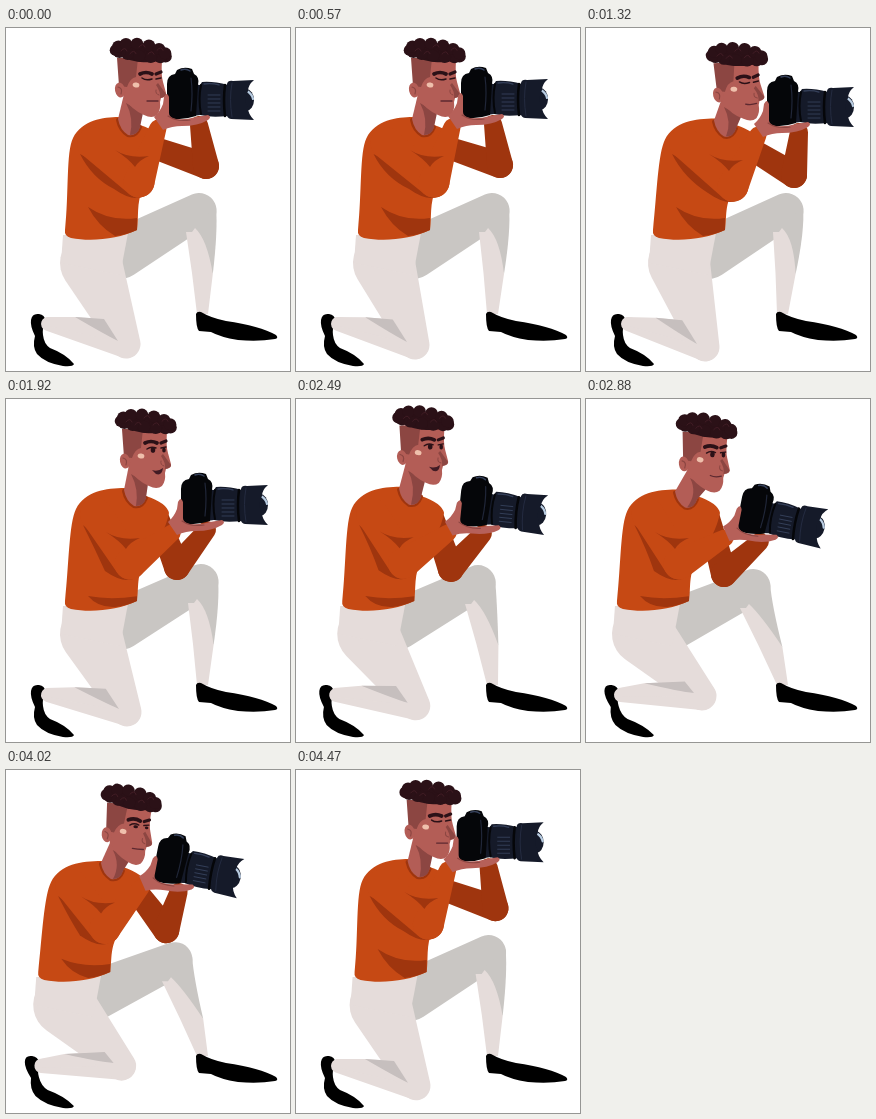
Animation of 284x343 px, one loop 4500 ms. Source, as an HTML page with a canvas:

```html
<!DOCTYPE html>
<html lang="en">
<head>
<meta charset="utf-8">
<title>Kneeling photographer</title>
<style>
html, body { margin: 0; width: 100%; height: 100%; overflow: hidden; background: #fff; }
canvas { display: block; width: 284px; height: 343px; }
</style>
</head>
<body>
<canvas id="stage"></canvas>
<script>
const W = 284, H = 343, LOOP = 4500;
const canvas = document.getElementById('stage');
const ctx = canvas.getContext('2d');
const dpr = window.devicePixelRatio || 1;
canvas.width = W * dpr;
canvas.height = H * dpr;

const C = {
  shirt: '#c64914', shirtDark: '#9f350e', skin: '#b35d56', skinDark: '#8c4642',
  hand: '#b66059', hair: '#2b1117', curl: '#49212a', blush: '#efc0ac',
  pants: '#e5dcda', pantsDark: '#c9c6c3', pantsFold: '#c6bfbe',
  black: '#050609', lens: '#151a29', steel: '#35405a', glint: '#b9cde2'
};

// Motion tracks: one value per time in TIMES.
const TIMES = [0, 570, 1320, 1920, 2250, 2880, 3600];
const TRACKS = {
  waist: [0, 3, 8, 0, -5, -28, -47],
  collar: [0, 4, 16, 6, 0, -23, -29],
  headX: [135, 139, 153, 140, 133, 119, 113],
  headY: [60, 60, 64, 60, 54, 64, 69],
  headTurn: [0, 0, -3, 0, 0, 3, 11],
  camX: [175, 179, 195, 189, 184, 168, 157],
  camY: [66, 65, 73, 100, 99, 110, 108],
  camTurn: [0, 0, 0, 0, 3, 11, 20],
  elbowX: [133, 138, 147, 124, 116, 93, 74],
  elbowY: [154, 154, 158, 165, 164, 165, 163],
  farElbowX: [200, 204, 208, 171, 165, 138, 130],
  farElbowY: [138, 137, 147, 168, 168, 175, 178],
  kneeX: [192, 195, 199, 194, 189, 166, 150],
  kneeY: [184, 184, 184, 184, 184, 189, 197],
  nearKneeX: [120, 119, 119, 121, 121, 116, 112],
  nearKneeY: [316, 317, 319, 313, 311, 297, 280],
  heel: [0, 0, 0, 0, 0, -7, -12],
  relaxed: [0, 0, 0, 1, 1, 1, 1],
  smile: [0, 0, .3, 1, .9, .4, .2]
};

// Monotone cubic interpolation around the loop.
function sample(values, t) {
  const n = TIMES.length;
  const time = k => TIMES[(k + n) % n] + LOOP * Math.floor(k / n);
  const val = k => values[(k + n) % n];
  const slope = k => (val(k + 1) - val(k)) / (time(k + 1) - time(k));
  const tangent = k => {
    const a = slope(k - 1), b = slope(k);
    return a * b > 0 ? 2 * a * b / (a + b) : 0;
  };
  let i = n - 1;
  while (TIMES[i] > t) i--;
  const span = time(i + 1) - time(i), u = (t - time(i)) / span, v = 1 - u;
  return val(i) * (1 + 2 * u) * v * v + val(i + 1) * (3 - 2 * u) * u * u
    + span * u * v * (tangent(i) * v - tangent(i + 1) * u);
}

const mix = (a, b, k) => a + (b - a) * k;

function fill(d, color) {
  ctx.fillStyle = color;
  ctx.fill(new Path2D(d));
}

function line(d, color, width) {
  ctx.strokeStyle = color;
  ctx.lineWidth = width;
  ctx.lineCap = ctx.lineJoin = 'round';
  ctx.stroke(new Path2D(d));
}

function oval(x, y, rx, ry, color, turn = 0) {
  ctx.fillStyle = color;
  ctx.beginPath();
  ctx.ellipse(x, y, rx, ry, turn, 0, Math.PI * 2);
  ctx.fill();
}

// Tapered limb: the hull of two circles.
function limb([x1, y1], r1, [x2, y2], r2, color) {
  const dir = Math.atan2(y2 - y1, x2 - x1);
  const open = Math.acos((r1 - r2) / Math.hypot(x2 - x1, y2 - y1));
  ctx.fillStyle = color;
  ctx.beginPath();
  ctx.arc(x1, y1, r1, dir + open, dir - open + Math.PI * 2);
  ctx.arc(x2, y2, r2, dir - open, dir + open);
  ctx.fill();
}

// Draws in a part's rest coordinates, moved and turned about its pivot.
function placed(x, y, degrees, pivotX, pivotY, draw) {
  ctx.save();
  ctx.translate(x, y);
  ctx.rotate(degrees * Math.PI / 180);
  ctx.translate(-pivotX, -pivotY);
  draw();
  ctx.restore();
}

function farLeg(p) {
  const { kneeX: x, kneeY: y } = p;
  const edgeX = mix(x + 18, 203, .6) + 1, edgeY = mix(y, 284, .62);
  limb([114 + p.waist, 226], 25, [x + 1, y - 1.5], 17.5, C.pantsDark);
  fill(`M${x + 18},${y - 5} Q${x + 20},${y + 18} ${edgeX},${edgeY}
    L${x},${y + 30} L${x - 4},${y + 14} Z`, C.pantsDark);
  fill(`M${x - 12},${y + 20} L${x - 6},${y + 20} L${x - 3},${y + 16}
    Q${x + 9},${y + 27} ${edgeX},${edgeY} L202,286 L191,286
    Q${mix(x - 12, 191, .5) + 1},${mix(y + 20, 286, .5)} ${x - 12},${y + 20} Z`, C.pants);
  fill(`M190,286 Q191,283 195,284 Q205,290 220,293 Q254,298 270,307
    Q273,310 269,311 Q252,314 232,312 Q214,309 205,304 L193,303 Q190,300 190,286 Z`, '#000');
}

function nearLeg(p) {
  ctx.save();
  ctx.transform(1, 0, -p.heel / 48, 1, p.heel * 337 / 48, 0);
  fill(`M25,292 Q26,285 33,286 Q39,287 39,292 Q36,302 37,307 Q38,316 44,320
    Q60,326 68,336 Q67,339 57,338 Q39,335 31,326 Q26,319 29,308 Q24,298 25,292 Z`, '#000');
  ctx.restore();

  const x = p.nearKneeX, y = p.nearKneeY, hipX = 88 + p.waist;
  const ankleX = 42 + p.heel, bend = 316 - y;
  const foldX = ankleX + 27 - bend * .2, foldY = 289 - bend * .25;
  const backX = x - 22 + bend * .25, backY = y - 25 + bend * .55;
  limb([x, y], 14, [ankleX, 296], 7, C.pants);
  fill(`M${ankleX - 2},289 L${foldX},${foldY} L${backX},${backY} L${x},${y} L${ankleX},298 Z`, C.pants);
  limb([hipX - 3, 235], 31, [x, y], 14.5, C.pants);
  fill(`M${hipX - 31},207 L${hipX + 34},205 L${hipX + 26},247 L${hipX - 33},235 Z`, C.pants);
  fill(`M${foldX},${foldY} L${backX},${backY} L${x - 8},${y - 3}
    Q${x - 22},${y - 10 + bend * .3} ${foldX},${foldY} Z`, C.pantsFold);
}

function farArm(p, wrist) {
  const elbow = [p.farElbowX, p.farElbowY];
  limb([146 + p.collar, 119], 11, elbow, 13, C.shirtDark);
  limb(elbow, 13, wrist, 9, C.shirtDark);
}

function shirt(p) {
  const b = p.waist, c = p.collar, s = (b + c) / 2, y = (p.headY - 60) * .4;
  const fold = 18 * p.relaxed;
  fill(`M${113 + c},${89 + y} C${97 + s},${89 + y} ${76 + s},${92 + y} ${67 + s},${110 + y}
    C${60 + s},${124 + y} ${63 + b},165 ${59 + b},202
    Q${58 + b},208 ${65 + b},210 C${86 + b},214 ${112 + b},211 ${131 + b},202
    C${133 + b},190 ${130 + b},175 ${137 + s},160
    Q${153 + c},135 ${157 + c},114 Q${155 + c},104 ${134 + c},97 Z`, C.shirt);
  fill(`M${82 + b},${179 + fold} Q${104 + b},${194 + fold * .4} ${131 + b},${190 + fold * .4}
    L${131 + b},202 Q${120 + b},207 ${109 + b},208 Q${92 + b},${198 + fold * .6} ${82 + b},${179 + fold} Z`,
    C.shirtDark);
}

function nearArm(p, wrist) {
  const s = (p.waist + p.collar) / 2, x = p.elbowX, y = p.elbowY;
  fill(`M${74 + s},126 Q${86 + s},150 ${x - 25},${y + 7} Q${x - 8},${y + 19} ${x + 3},${y + 15}
    L${x - 5},${y} Z`, C.shirtDark);
  limb([87 + s, 115], 16, [x, y], 15.5, C.shirt);
  limb([x, y], 15.5, wrist, 8.5, C.shirt);
  fill(`M${x - 24},${y - 32} Q${x - 10},${y - 23} ${x + 10},${y - 26}
    Q${x},${y - 22} ${x - 4},${y - 15} Q${x - 10},${y - 23} ${x - 24},${y - 32} Z`, C.shirtDark);
}

function neck(p) {
  const c = p.collar, y = (p.headY - 60) * .4, x = p.headX, h = p.headY;
  const base = `Q${114 + c},${102 + y} ${122 + c},${107 + y} Q${130 + c},${109 + y} ${134 + c},${99 + y}`;
  line(`M${112 + c},${92 + y} ${base}`, C.shirtDark, 4);
  fill(`M${x - 17},${h + 6} L${112 + c},${91 + y} ${base} L${x},${h + 20} Z`, C.skin);
  fill(`M${x - 15},${h + 15} Q${x - 7},${h + 30} ${124 + c},${107 + y}
    Q${132 + c},${107 + y} ${134 + c},${99 + y} L${x + 2},${h + 25} Z`, C.skinDark);
}

function face(p) {
  fill(`M114,30 L156,32 Q155,48 157,54 L160,65 Q161,69 155,70 L154,74
    Q155,82 151,87 Q146,91 138,87 Q126,82 118,70 Z`, C.skin);
  fill('M111,30 H132 L130,49 Q124,50 121,59 L113,58 Z', C.skinDark);
  fill('M152,55 L160,66 Q160,69 154,70 Q155,64 150,57 Z', C.skinDark);
  oval(114, 62, 5, 7.5, C.skin, -.2);
  line('M112,59 Q117,60 115,66', C.skinDark, 1.2);
  oval(130, 57, 3.4, 2.5, C.blush, .2);

  const lift = 2 * p.relaxed;
  line(`M134,${46 - lift} Q140,${43 - lift} 146,${46 - lift}`, C.hair, 3.7);
  line(`M150,${46 - lift} L155,${44 - lift}`, C.hair, 3.2);
  if (p.relaxed > .5) {
    oval(142, 51, 2.3, 2.8 * p.relaxed, C.hair);
    oval(153, 51, 1.8, 2.6 * p.relaxed, C.hair);
    line('M136,50 Q140,47 145,49 M150,49 L155,48', C.hair, 1.4);
  } else {
    line('M136,50 Q140,53 146,51 M150,51 L155,50', C.hair, 1.5);
  }
  line('M150,62 Q149,66 153,67', C.skinDark, 1);
  const corner = 73 - 2 * p.smile;
  if (p.smile > .65) {
    fill('M141,71 Q147,73 152,69 Q151,77 145,75 Z', '#421b24');
  } else {
    line(`M141,${corner} Q146,${73 + 3 * p.smile} 152,${corner}`, '#5d2930', 1.3);
  }
}

function hair() {
  oval(135, 25, 25, 9, C.hair, .1);
  for (let i = 0; i < 13; i++) {
    const a = i * Math.PI * 2 / 13 + .2, up = Math.sin(a);
    oval(135 + 25 * Math.cos(a), 25 + (up < 0 ? 9 : 3) * up + 3 * Math.cos(a), 6.3, 6, C.hair);
  }
  for (let i = 0; i < 5; i++) {
    const x = 115 + i * 9, y = 23 + 4 * Math.sin(i * 2.4);
    line(`M${x},${y} q4,-5 6,0`, C.curl, .7);
  }
}

function camera() {
  fill('M186,56 L194,57 L196,54 Q207,53 222,57 L222,88 Q205,90 194,87 L187,88 Z', C.lens);
  fill(`M161,56 Q161,47 169,46 L171,42 Q178,38 186,41 L188,46 Q194,49 192,57 L190,88
    Q178,92 167,91 Q161,89 161,82 Z`, C.black);
  line('M175,42 Q180,40 184,43', C.steel, 1.5);
  line('M185,50 Q187,65 185,83', '#202638', 1.2);
  line('M195,57 Q192,71 195,86', C.black, 2);
  line('M198,56 Q206,55 213,57', C.steel, 1.3);
  for (let y = 67; y < 84; y += 4) line(`M202,${y} H214`, C.steel, .9);
  oval(240, 72, 8, 11, C.lens);
  line('M241,63 Q246,66 247,71', C.glint, 2.2);
  fill(`M221,56 Q222,52 227,53 L248,52 Q242,57 242,63
    Q237,72 242,80 Q242,86 248,92 L225,91 Q221,90 221,87 Z`, C.lens);
  line('M219,57 Q217,72 219,88', C.black, 2.5);
  line('M226,55 Q223,71 226,89', '#242b40', 1);
}

function hand() {
  fill(`M148,89 Q154,84 157,76 L158,69 Q161,63 163,69 L163,85 Q163,89 169,91
    Q180,92 190,89 L202,87 Q206,89 202,92 Q192,98 176,98 Q166,98 157,102 Z`, C.hand);
  line('M162,88 Q171,94 184,92', C.skinDark, 1.1);
}

function draw(t) {
  const p = {};
  for (const name in TRACKS) p[name] = sample(TRACKS[name], t);

  const turn = p.camTurn * Math.PI / 180, cos = Math.cos(turn), sin = Math.sin(turn);
  const onCamera = (x, y) => [p.camX + x * cos - y * sin, p.camY + x * sin + y * cos];

  ctx.setTransform(dpr, 0, 0, dpr, 0, 0);
  ctx.fillStyle = '#fff';
  ctx.fillRect(0, 0, W, H);

  farLeg(p);
  nearLeg(p);
  farArm(p, onCamera(18 - 6 * p.relaxed, 31));
  shirt(p);
  neck(p);
  placed(p.headX, p.headY, p.headTurn, 135, 60, () => { face(p); hair(); });
  nearArm(p, onCamera(-23, 34));
  placed(p.camX, p.camY, p.camTurn, 175, 66, () => { camera(); hand(); });
}

function tick() {
  draw(performance.now() % LOOP);
  requestAnimationFrame(tick);
}
tick();
</script>
</body>
</html>
```
